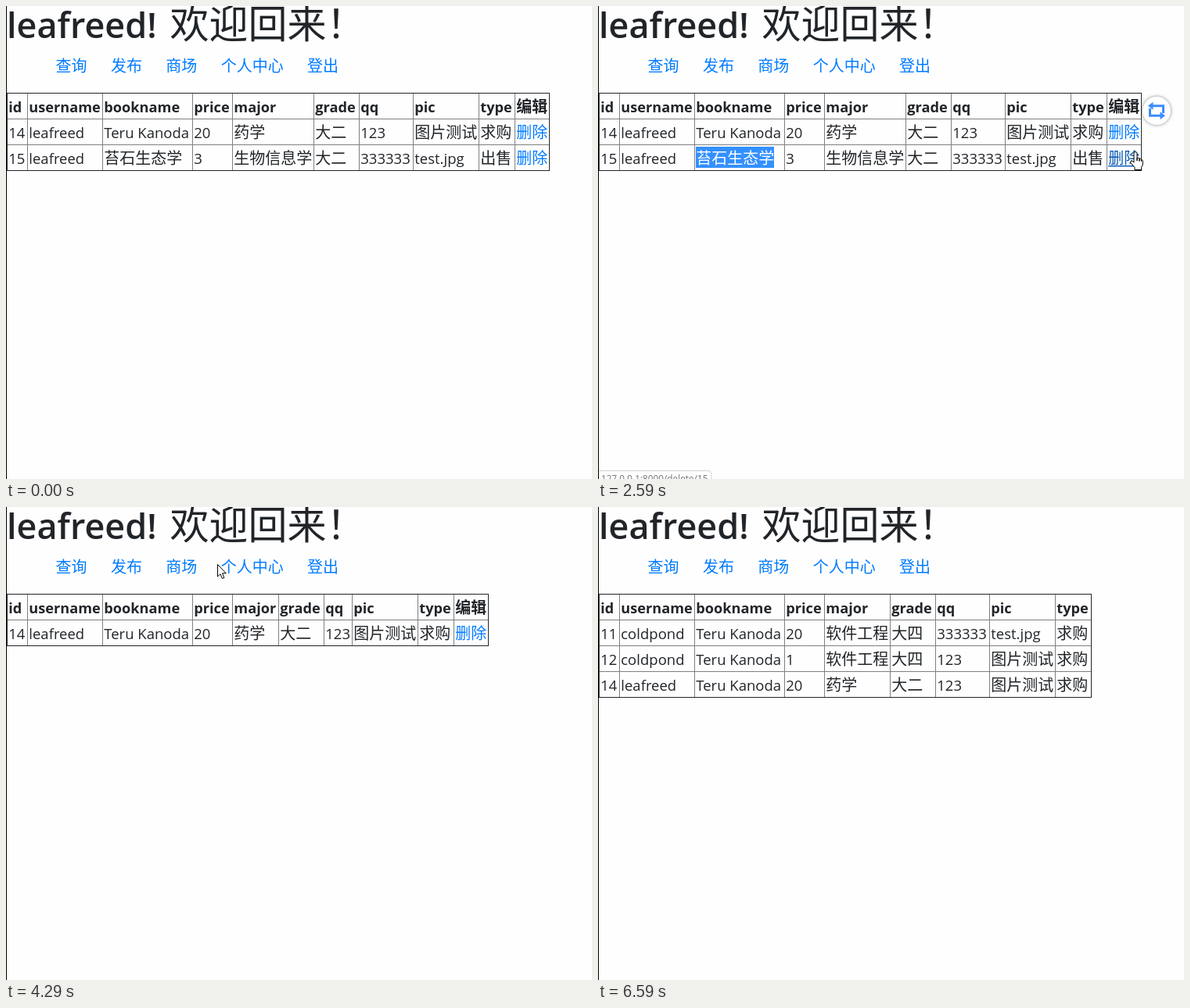
An HTML page for the animation above (7220 ms loop, 749x605 px).

```html
<!DOCTYPE html>
<html lang="zh">
<head>
<meta charset="utf-8">
<title>Book list</title>
<style>
  html, body { margin: 0; width: 100%; height: 100%; overflow: hidden; background: #fefefe; }
  svg { display: block; width: 749px; height: 605px; }
  text { fill: #212529; white-space: pre; }
  .latin { font-family: "Open Sans", "Noto Sans", sans-serif; }
  .cjk { font-family: "Noto Sans CJK SC", "Noto Sans CJK", sans-serif; }
  .link text { fill: #007bff; }
  .link rect { fill: #0056b3; visibility: hidden; }
  .link.hover text { fill: #0056b3; }
  .link.hover rect { visibility: visible; }
  .overlay { pointer-events: none; }
  .button { fill: #fff; filter: drop-shadow(0 0 2px #0007); }
</style>
</head>
<body>
<svg id="stage" viewBox="0 0 749 605"></svg>
<script>
const LOOP = 7220, STEP = 77, EM = 20, ROW = 33, TOP = 111;
const stage = document.getElementById('stage');

function add(parent, tag, attrs = {}, content = '') {
  const el = document.createElementNS('http://www.w3.org/2000/svg', tag);
  for (const key in attrs) el.setAttribute(key, attrs[key]);
  el.textContent = content;
  parent.append(el);
  return el;
}

const isCjk = s => /[\u3000-\uffef]/.test(s);

function label(parent, x, y, s, { bold = false, fill } = {}) {
  const cjk = isCjk(s);
  const attrs = {
    x, y, class: cjk ? 'cjk' : 'latin',
    'font-size': cjk ? EM : bold ? 18.2 : 18.5,
    'font-weight': bold ? 700 : 400
  };
  if (fill) attrs.style = `fill:${fill}`;
  return add(parent, 'text', attrs, s);
}

function link(parent, x, y, s, path) {
  const g = add(parent, 'g', { class: 'link', 'data-path': path });
  label(g, x, y, s);
  add(g, 'rect', { x, y: y + 2, width: s.length * EM, height: 1.4 });
}

// Columns are as wide as their heading, or wider for long Chinese text and numbers
const minWidth = { id: 26, username: 96, bookname: 115, price: 51, major: 59,
  grade: 58, qq: 36, pic: 84, type: 46, 编辑: 44 };

function cellWidth(s) {
  if (isCjk(s)) return s.length * EM + 4;
  return /^\d+$/.test(s) ? Math.round(s.length * 10.8 + 4) : 0;
}

function table(...lines) {
  const rows = lines.map(line => line.split('|'));
  const g = add(stage, 'g');
  const height = rows.length * ROW;
  const rule = (x, y, width, height) => add(g, 'rect', { x, y, width, height, fill: '#808080' });
  let x = 1;
  rows[0].forEach((name, c) => {
    if (c) rule(x, TOP, 1, height);
    rows.forEach((row, r) => {
      const at = [x + 2.3, TOP + 25 + r * ROW, row[c]];
      if (row[c] === '删除') link(g, ...at, 'delete/' + row[0]);
      else label(g, ...at, { bold: r === 0 });
    });
    x += Math.max(minWidth[name], ...rows.map(row => cellWidth(row[c])));
  });
  for (let r = 1; r < rows.length; r++) rule(1, TOP + r * ROW, x - 1, 1);
  add(g, 'rect', { x: 1.5, y: TOP + .5, width: x - 1, height, fill: 'none', stroke: '#212529' });
  return g;
}

// Page
add(stage, 'text', { x: 1, y: 41, class: 'latin', 'font-size': 45, 'font-weight': 600 }, 'leafreed!');
add(stage, 'text', { x: 209.5, y: 41, class: 'cjk', 'font-size': 50 }, '欢迎回来！');
const menu = { 查询: 'search/', 发布: 'publish/', 商场: 'list/', 个人中心: 'personal/', 登出: 'logout/' };
let menuX = 63.5;
for (const name in menu) {
  link(stage, menuX, 84, name, menu[name]);
  menuX += name.length * EM + 30.4;
}

const head = 'id|username|bookname|price|major|grade|qq|pic|type';
const wanted = '14|leafreed|Teru Kanoda|20|药学|大二|123|图片测试|求购';
const title = '苔石生态学';
const pages = [
  table(head + '|编辑', wanted + '|删除', `15|leafreed|${title}|3|生物信息学|大二|333333|test.jpg|出售|删除`),
  table(head + '|编辑', wanted + '|删除'),
  table(head, '11|coldpond|Teru Kanoda|20|软件工程|大四|333333|test.jpg|求购',
    '12|coldpond|Teru Kanoda|1|软件工程|大四|123|图片测试|求购', wanted)
];

function selection(from, to) {
  const g = add(stage, 'g');
  const x = 125 + from * EM;
  add(g, 'rect', { x, y: 180, width: (to - from) * EM, height: 27, fill: '#3390ff' });
  label(g, x + .3, 202, title.slice(from, to), { fill: '#fff' });
  return g;
}
const word = selection(2, 4), wholeTitle = selection(0, title.length);

// Floating button
const popup = add(stage, 'g', { class: 'overlay' });
add(popup, 'circle', { r: 18, class: 'button' });
for (const turn of [0, 180]) {
  const arm = add(popup, 'g', { transform: `rotate(${turn})`, fill: '#3b8cff' });
  add(arm, 'path', { d: 'M-6 -6.3H8.5V3', fill: 'none', stroke: '#3b8cff', 'stroke-width': 3 });
  add(arm, 'path', { d: 'M-11 -6.3L-4.5 -11.3V-1.3Z' });
}

// Status bar
const status = add(stage, 'g', { class: 'overlay' });
const statusBox = add(status, 'rect', { x: -3.5, y: 594.5, height: 20, rx: 4, fill: '#fff', stroke: '#d2d2d2' });
const statusText = add(status, 'text', { x: 4, y: 609, class: 'latin', 'font-size': 11.8, style: 'fill:#707479' });

add(stage, 'rect', { width: 1, height: 605, fill: '#000' });

// Pointer
const pointer = add(stage, 'g', { class: 'overlay' });
const ring = add(pointer, 'circle', { r: 12, fill: '#fff500', opacity: .55 });
const outline = { fill: '#fff', stroke: '#000', 'stroke-linejoin': 'round' };
const shapes = {
  arrow: add(pointer, 'path', { ...outline, d: 'M.5 .5V16L4 12.7L6.4 18.5L8.9 17.5L6.5 11.8H11.3Z' }),
  beam: add(pointer, 'path', { d: 'M-3 -7.5H-1L0 -6.5L1 -7.5H3M0 -6.5V6.5M-3 7.5H-1L0 6.5L1 7.5H3',
    fill: 'none', stroke: '#333' }),
  hand: add(pointer, 'path', { ...outline,
    d: 'M0 14V2.5a2 2 0 0 1 4 0V12V8.5q2-1 3 .7V12.5V9.2q2-.8 2.5 .8V13V10.5q1.8 0 1.8 2V17L9.5 20.5V23.5H1V20.5L-4.5 14q0-2.6 2.4-1.6Z' })
};

// The pointer enters from the first place and leaves after the last
const moves = [
  { start: 0, end: 0, to: [558, 502] },
  { start: 210, end: 440, to: [185, 231] },
  { start: 590, end: 750, to: [182, 193] },
  { start: 1670, end: 2210, to: [738, 190] },
  { start: 2360, end: 2440, to: [685, 186] },
  { start: 2900, end: 3520, to: [302, 73] },
  { start: 4050, end: 4670, to: [226, 73] },
  { start: 5440, end: 5900, to: [163, 242] },
  { start: 5980, end: 6130, to: [272, 229] },
  { start: 6210, end: 6520, to: [705, 575] }
];
const ENTER = 210, LEAVE = 6590;

const clicks = [
  { down: 980, up: 1060 },
  { down: 1440, up: 1520 },
  { down: 2510, up: 2590, load: 2670, page: 1 },
  { down: 3670, up: 4050, load: 3820, page: 1 },
  { down: 4820, up: 5130, load: 5130, page: 2 }
];

const smooth = p => p * p * (3 - 2 * p);
const show = (el, on) => el.setAttribute('visibility', on ? 'visible' : 'hidden');
const place = (el, [x, y]) => el.setAttribute('transform', `translate(${x} ${y})`);

function pointerAt(t) {
  const i = moves.findLastIndex(m => m.start <= t);
  const { start, end, to } = moves[i];
  if (t >= end) return to;
  const steps = Math.round((end - start) / STEP) + 1;
  const p = smooth((Math.floor((t - start + 4) / STEP) + 1) / steps);
  return moves[i - 1].to.map((v, axis) => Math.round(v + (to[axis] - v) * p));
}

const under = t => document.elementFromPoint(...pointerAt(t));
const linkUnder = t => under(t)?.closest('.link');

function draw(t) {
  const loaded = clicks.findLast(c => c.load <= t);
  pages.forEach((g, i) => { g.style.display = i === (loaded?.page ?? 0) ? '' : 'none'; });

  const pressed = clicks.filter(c => c.down <= t).length;
  const released = clicks.findLast(c => c.up <= t);
  for (const [el, on] of [[word, pressed === 1], [wholeTitle, pressed > 1]]) {
    el.style.display = on && !loaded ? '' : 'none';
  }
  show(popup, released && !loaded);
  if (released) {
    const [x, y] = pointerAt(released.up);
    place(popup, [x + 29, y - 52]);
  }

  // A fresh page reacts only once the pointer moves again
  const active = linkUnder(t);
  const lastMove = moves.findLast(m => m.start <= t).start;
  const hovered = !loaded || lastMove > loaded.load ? active : null;
  for (const el of stage.querySelectorAll('.link')) el.classList.toggle('hover', el === hovered);

  // The address appears when the pointer rests on a link
  const resting = active && linkUnder(t - STEP - 3) === active;
  show(status, resting);
  if (resting) {
    statusText.textContent = '127.0.0.1:8000/' + active.dataset.path;
    statusBox.setAttribute('width', statusText.getComputedTextLength() + 12);
  }

  const present = t >= ENTER && t < LEAVE;
  const shape = hovered ? 'hand' : !active && under(t)?.tagName === 'text' ? 'beam' : 'arrow';
  place(pointer, pointerAt(t));
  for (const key in shapes) show(shapes[key], present && key === shape);
  show(ring, clicks.some(c => c.down <= t && t < c.up));
}

const began = performance.now();
function tick() {
  draw((performance.now() - began) % LOOP);
  requestAnimationFrame(tick);
}
tick();
</script>
</body>
</html>
```
